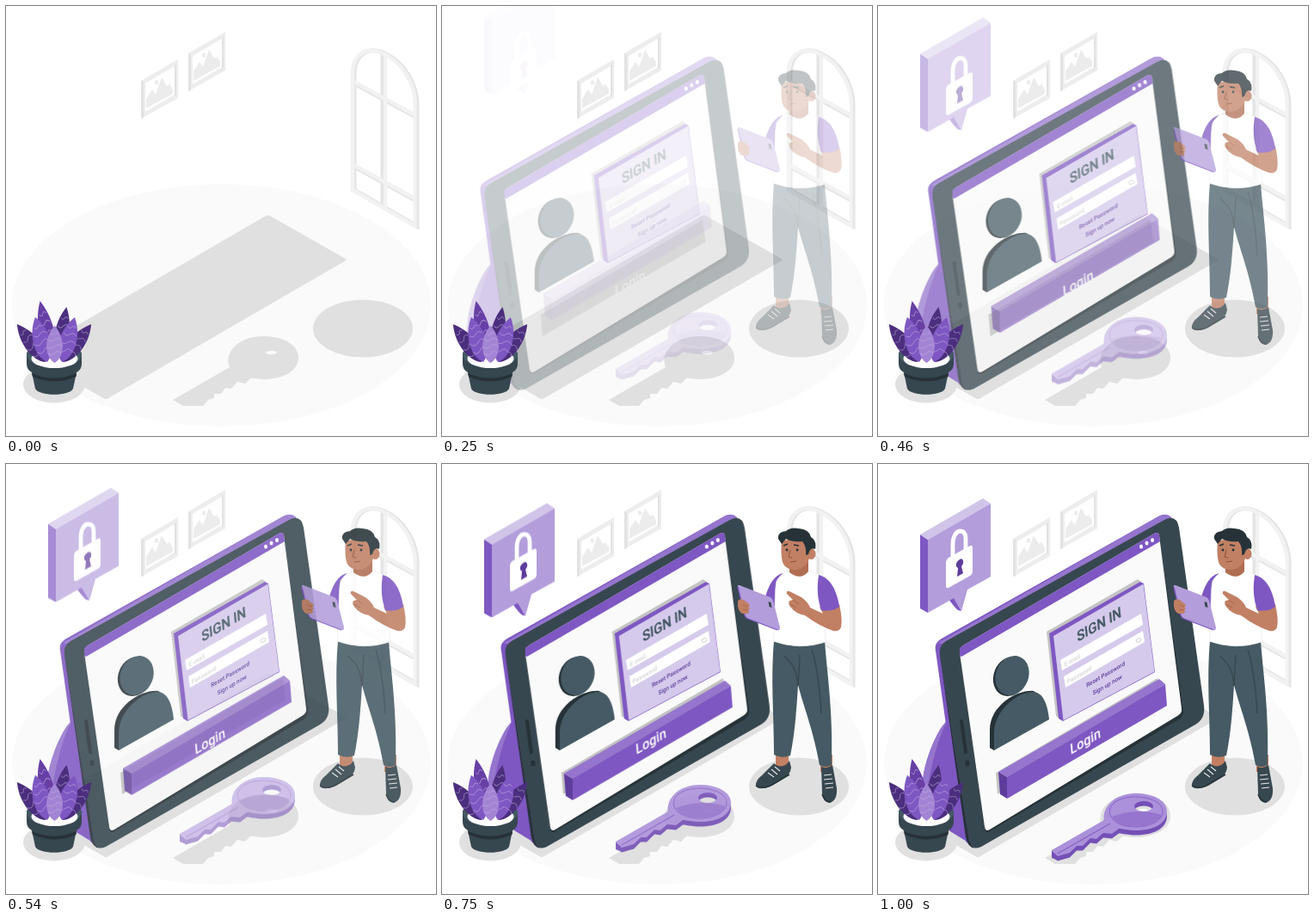
An HTML page without scripts that plays this animation: 500x500 px, repeating every 1040 ms.

```html
<!DOCTYPE html>
<html lang="en">
<head>
<meta charset="utf-8">
<title>Sign in</title>
<style>
html, body { margin: 0; width: 100%; height: 100%; overflow: hidden; background: #fff; }
svg { display: block; width: 100vw; height: 100vh; }
text { font-family: Roboto, Inter, sans-serif; font-weight: 500; }

.device, .button, .bubble, .lock, .man, .key { animation: 1040ms linear infinite; }
.device { --x: -32px; --y: 0px; animation-name: glide, fade; }
.button { --x: 0px; --y: -34px; animation-name: glide, fade; }
.bubble { --x: 0px; --y: -100px; animation-name: glide, fade-late; }
.lock { --x: 0px; --y: 34px; animation-name: glide; }
.man { animation-name: fade; }
.key { animation-name: drop, fade-slow; }

@keyframes glide {
  0% { transform: translate(var(--x), var(--y)); }
  12% { transform: translate(calc(var(--x) * .91), calc(var(--y) * .91)); }
  24% { transform: translate(calc(var(--x) * .7), calc(var(--y) * .7)); }
  36.5% { transform: translate(calc(var(--x) * .41), calc(var(--y) * .41)); }
  51.9% { transform: translate(calc(var(--x) * .125), calc(var(--y) * .125)); }
  64.4% { transform: translate(0, 0); }
  72.1% { transform: translate(calc(var(--x) * -.055), calc(var(--y) * -.055)); }
  80% { transform: translate(calc(var(--x) * -.062), calc(var(--y) * -.062)); }
  88% { transform: translate(calc(var(--x) * -.035), calc(var(--y) * -.035)); }
  96%, 100% { transform: translate(0, 0); }
}
@keyframes drop {
  0% { transform: translateY(-30px); }
  24% { transform: translateY(-27px); }
  36.5% { transform: translateY(-24px); }
  51.9% { transform: translateY(-19px); }
  64.4% { transform: translateY(-14px); }
  72.1% { transform: translateY(-10px); }
  96%, 100% { transform: none; }
}
@keyframes fade {
  0% { opacity: 0; }
  24% { opacity: .28; }
  36.5% { opacity: .58; }
  51.9% { opacity: .87; }
  64.4%, 100% { opacity: 1; }
}
@keyframes fade-late {
  0% { opacity: 0; }
  24% { opacity: .04; }
  36.5% { opacity: .16; }
  51.9% { opacity: .68; }
  64.4%, 100% { opacity: 1; }
}
@keyframes fade-slow {
  0% { opacity: 0; }
  24% { opacity: .16; }
  36.5% { opacity: .29; }
  51.9% { opacity: .54; }
  64.4% { opacity: .8; }
  72.1% { opacity: .9; }
  96%, 100% { opacity: 1; }
}
</style>
</head>
<body>
<svg viewBox="0 0 500 500" fill="none">
  <defs>
    <g id="leaf">
      <path d="M0 0C-13 -8 -15 -32 0 -50C15 -32 13 -8 0 0Z"/>
      <path d="M-9 -13q5 5 9 0t9 0M-10 -22q5 5 10 0t10 0M-8 -31q4 4 8 0t8 0M-5 -39q3 3 5 0t5 0" fill="none" stroke="#d1c4e9" stroke-opacity=".55" stroke-width=".8"/>
    </g>
    <g id="picture">
      <path d="M157 87L200 62V107L157 131Z" fill="#ededed"/>
      <path d="M157 87l3 1.500V130l-3 1ZM196 69l2 -1v36l-2 1Z" fill="#e2e2e2"/>
      <path d="M162 90L196 70V103L162 123Z" fill="#fff"/>
      <path d="M163 119V108L170 97L174 103L181 83L187 93L190 91L194 97V102Z" fill="#ececec"/>
      <ellipse cx="175" cy="89" rx="2.200" ry="2.800" fill="#ececec"/>
    </g>
    <path id="keyface" fill-rule="evenodd" d="M202 449L263 414C260 400 275 383 299 383C320 383 336 391 336 404C336 419 319 426 300 426C290 426 284 424 280 424L272 430L262 429L254 436L247 435L238 444L231 444L223 452L209 456Z
      M298 398a11 6 0 1 0 22 0a11 6 0 1 0 -22 0Z"/>
    <path id="arch" d="M403 214V79C403 57 418 46 438 55C461 65 476 91 476 115V256Z"/>
    <path id="bars" d="M439.500 56V235M403 88L476 128M403 185L476 225"/>
  </defs>

  <ellipse cx="250.500" cy="348" rx="243.500" ry="141" fill="#fafafa"/>

  <g fill="#e0e0e0">
    <path d="M302 244Q304.500 242.500 307 244L395 294Q396.500 295 395 296L118 456.500Q116 457.500 114 456.500L25 405Z"/>
    <ellipse cx="415" cy="375" rx="58" ry="33.500"/>
    <ellipse cx="56" cy="440" rx="36" ry="21.500"/>
    <path fill-rule="evenodd" d="M194 458L260 420C253 402 271 384 299 384C323 384 340 394 340 409C340 425 321 434 300 434C292 434 288 432 284 433L278 439L269 437L262 445L255 444L250 451L242 451V456L235 458L229 465H206Z
      M302 403a6.500 2.200 0 1 0 13 0a6.500 2.200 0 1 0 -13 0Z"/>
  </g>

  <use href="#picture"/>
  <use href="#picture" x="55" y="-32"/>

  <g stroke="#e4e4e4" stroke-width="5">
    <use href="#bars" x="-1.500"/>
    <use href="#arch" x="2"/>
  </g>
  <g stroke="#f2f2f2" stroke-width="4.500">
    <use href="#bars" x="1.500"/>
    <use href="#arch"/>
  </g>
  <path d="M478.500 116V258" stroke="#e8e8e8" stroke-width="2"/>

  <g class="bubble">
    <path d="M49 82L58 88V173L49 168Z" fill="#7e57c2"/>
    <path d="M49 82L122 40L131 46L58 88Z" fill="#d1c4e9"/>
    <path d="M82 157L88 155L97 171L93 170Q90 168 82 157Z" fill="#7e57c2"/>
    <path d="M58 88L131 46V131L104 146L97 171L88 156L58 173Z" fill="#b39ddb"/>
    <g class="lock">
      <path d="M87 110V94C87 84 91 78 96 78C101 78 102 82 102 87V101" stroke="#fff" stroke-width="4.800"/>
      <path d="M79 114Q79 111 82 109L107 95Q110 94 110 97V125Q110 128 107 130L82 144Q79 145 79 142Z" fill="#fff"/>
      <path d="M95 111c4 -3 6 4 2 8l2 8l-7 4l1 -10c-4 -2 -2 -8 2 -10Z" fill="#5e3c9c"/>
    </g>
  </g>

  <g class="device">
    <path d="M80 299C70 308 58 335 53 360L48 405L100 437Z" fill="#7e57c2"/>
    <path d="M80 299C70 308 58 335 53 360L48 405L54 408C58 365 66 328 80 299Z" fill="#9575cd"/>
    <path d="M67 217Q65 208 74 203L326 61Q335 56 341 62L350 80L376 290L112 446Q101 440 97 432Z" fill="#7e57c2"/>
    <path d="M70 208L328 60Q336 57 341 62L80 211Z" fill="#9575cd"/>
    <path d="M72 223Q70 211 79 206L333 65Q347 58 350 74L379 281Q381 296 369 303L120 445Q109 450 106 437Z" fill="#37474f"/>
    <path d="M72 223L106 437Q109 450 120 445L116 446Q105 449 102 434Z" fill="#263238"/>
    <path d="M95 220Q94 214 99 211L321 81Q326 78 327 83L355 286Q356 293 350 297L130 427Q125 430 124 424Z" fill="#263238"/>
    <path d="M95 220Q94 214 99 211L321 81Q326 78 327 83L353 284Q354 290 348 293L130 425Q125 428 124 422Z" fill="#fafafa"/>
    <path d="M95 223V218Q94 214 99 211L321 81Q326 78 327 83L328 90L97 224Z" fill="#7e57c2"/>
    <g fill="#fff">
      <ellipse cx="306" cy="96" rx="2" ry="2.500"/>
      <ellipse cx="312.500" cy="92" rx="2" ry="2.500"/>
      <ellipse cx="319" cy="88.500" rx="2" ry="2.500"/>
    </g>
    <path d="M97 299L102 335" stroke="#263238" stroke-width="4" stroke-linecap="round"/>
    <ellipse cx="104" cy="348" rx="2.600" ry="3.400" fill="#263238"/>

    <g fill="#263238">
      <ellipse cx="153.500" cy="247" rx="19" ry="23.500" transform="rotate(22 153.500 247)"/>
      <path d="M135 333L130 330V309C130 281 162 262 181 264L190 270Z"/>
    </g>
    <g fill="#455a64">
      <ellipse cx="156" cy="246" rx="19" ry="23.500" transform="rotate(22 156 246)"/>
      <path d="M135 333V311C136 285 164 264 181 265C192 266 197 279 199 297Z"/>
    </g>

    <path d="M196 195L302 134L306 137L200 199L211 296L207 293Z" fill="#c4c4c4"/>
    <path d="M199 197L305 137L309 139L322 242L215 299L210 296Z" fill="#7e57c2"/>
    <path d="M204 200L308.500 139.500L321.500 241.500L215.500 298Z" fill="#d5caec"/>
    <path d="M212 228L306 174L308 187L214 240ZM216 247L308 194L310 207L218 260Z" fill="#fff"/>
    <ellipse cx="303" cy="205" rx="3" ry="2" transform="rotate(-30 303 205)" stroke="#d5d5d5"/>
    <text transform="matrix(.86 -.5 .1 .98 232 207)" font-size="17" fill="#455a64" stroke="#455a64" stroke-width=".3">SIGN IN</text>
    <g font-size="7.500" fill="#d4d4d4">
      <text transform="matrix(.86 -.5 .1 .98 217 236)">E-mail</text>
      <text transform="matrix(.86 -.5 .1 .98 220 256)">Password</text>
    </g>
    <g font-size="7.200" fill="#5e3c9c">
      <text transform="matrix(.86 -.5 .1 .98 242.500 260)">Reset Password</text>
      <text transform="matrix(.86 -.5 .1 .98 250 269)">Sign up now</text>
    </g>

    <path d="M137 359L325 249L329 274L139 384Z" fill="#c4c4c4"/>
    <g class="button">
      <path d="M140 358L150 364V389L142 384Z" fill="#5e3c9c"/>
      <path d="M140 358L327 250L334 256L150 364Z" fill="#9575cd"/>
      <path d="M150 364L334 256L336 281L152 388L150 389Z" fill="#7e57c2"/>
    </g>
    <text transform="matrix(.86 -.5 .1 .98 224 338)" font-size="16.500" fill="#fff">Login</text>
  </g>

  <g class="man">
    <path d="M388 334h15v18h-15ZM440 338h14v20h-14Z" fill="#c17f63"/>
    <path d="M386 348C391 353 399 353 404 345L406 353Q405 361 398 365L383 374Q370 380 365 375Q364 368 372 362Z" fill="#37474f"/>
    <path d="M365 374Q372 379 384 373L404 361" stroke="#263238" stroke-width="1.500"/>
    <path d="M441 352Q448 355 454 350Q456 361 459 377Q460 391 451 394Q443 394 442 383Z" fill="#37474f"/>
    <path d="M442 384Q445 393 452 393" stroke="#263238" stroke-width="1.500"/>
    <path d="M379 359l7 5M383 355l7 6M387 352l6 5M444 362l9 -1M444 367l10 -1M445 372l10 -1M446 377l9 -1" stroke="#e6e6e6" stroke-width="1.100"/>

    <path d="M386 205H445C447 238 455 285 453 350Q446 354 439 350C432 310 421 284 414 257C412 290 410 315 405 339Q395 343 386 338C386 290 382 250 386 205Z" fill="#455a64"/>
    <path d="M414 258C413 244 410 233 397 223M414 258L416 222M430 216Q438 240 441 290" stroke="#37474f" stroke-width="1.400"/>

    <path d="M396 127C383 131 376 148 373 170L388 184Z" fill="#7e57c2"/>
    <path d="M403 125Q414 134 427 124L441 130C446 150 445 180 446 207Q416 217 385 206C388 180 386 150 389 136Q394 127 403 125Z" fill="#fff" stroke="#ebebeb" stroke-width=".7"/>
    <path d="M404 112H426V125Q417 136 404 126Z" fill="#b06d52"/>

    <path d="M395 89C394 99 394 113 398 118Q406 126 418 121Q427 116 428 105L427 85Z" fill="#c17f63"/>
    <ellipse cx="429.500" cy="104.500" rx="5" ry="6.500" fill="#c17f63"/>
    <path d="M391 87Q390 79 400 78Q405 73 415 75Q427 76 429 85Q436 89 434 99Q428 96 426 105L423 106Q424 96 419 90Q408 91 400 87L395 93Z" fill="#263238"/>
    <path d="M397 95l5 -2M409 94l6 1" stroke="#263238" stroke-width="1.500"/>
    <circle cx="401" cy="100" r="1.400" fill="#263238"/>
    <circle cx="413" cy="100" r="1.400" fill="#263238"/>
    <path d="M405 100L403 108L407 109M405 114l7 -1" stroke="#8f513a"/>

    <path d="M344 143Q343 140 346 141L382 155Q384 156 385 159L393 190Q393 194 390 193L356 180Q353 179 352 176Z" fill="#b39ddb"/>
    <path d="M344 143L352 176Q353 179 356 180L390 193" stroke="#7e57c2" stroke-width="1.300"/>
    <path d="M379.500 160l3 1l1 6l-3 -1Z" fill="#37474f"/>
    <path d="M344 160Q345 156 351 158L357 163Q359 165 356 166Q359 168 356 170Q359 173 354 174L349 174Q343 170 344 160Z" fill="#c17f63"/>
    <path d="M350 164l6 2M350 169l6 1" stroke="#a3624a" stroke-width=".8"/>

    <path d="M439 166L462 163Q466 181 464 190Q462 195 455 194Q438 188 422 176Q411 174 405 166Q402 162 404 159L408 158L401 151Q400 147 404 148L418 155Q426 161 428 167L443 174Z" fill="#c17f63"/>
    <path d="M408 158l7 5M405 163l7 4" stroke="#a3624a" stroke-width=".9"/>
    <path d="M438 129C451 132 459 146 462 166Q454 172 441 170C436 155 436 143 438 129Z" fill="#7e57c2"/>
  </g>

  <g class="key">
    <use href="#keyface" y="5.500" fill="#7450b6"/>
    <path d="M202 449L209 456V461L202 458Z" fill="#7450b6"/>
    <use href="#keyface" fill="#ab90da"/>
    <path d="M270 408C266 394 283 387 299 387C317 387 331 394 331 404C331 415 316 422 300 422C285 422 273 417 270 408Z" stroke="#8763c5"/>
    <path d="M272 410Q300 399 330 408Q325 422 300 422Q280 422 272 410Z" fill="#9575cd"/>
    <path d="M209 453L270 418" stroke="#8763c5" stroke-width="1.200"/>
  </g>

  <path d="M24 405C24 391 88 391 88 405V416Q88 423 82 426L78 445C74 454 38 454 34 445L30 426Q24 423 24 416Z" fill="#37474f"/>
  <path d="M24 405C24 391 88 391 88 405C88 425 24 425 24 405Z" fill="#455a64"/>
  <ellipse cx="56.500" cy="410" rx="27" ry="11" fill="#fff"/>
  <path d="M30 427Q56 438 82 427L81.500 431Q56 442 31 431Z" fill="#263238"/>
  <g>
    <use href="#leaf" transform="translate(54 411) rotate(-12) scale(.85 1.390)" fill="#673fa5"/>
    <use href="#leaf" transform="translate(60 409) rotate(10) scale(.8 1.200)" fill="#4b2e7d"/>
    <use href="#leaf" transform="translate(46 414) rotate(-37) scale(.85 1.100)" fill="#4b2e7d"/>
    <use href="#leaf" transform="translate(66 414) rotate(37) scale(.85 1.100)" fill="#4b2e7d"/>
    <use href="#leaf" transform="translate(48 414) rotate(-15) scale(.95 1.080)" fill="#7e57c2"/>
    <use href="#leaf" transform="translate(65 414) rotate(16) scale(.95 1.080)" fill="#7e57c2"/>
    <use href="#leaf" transform="translate(56.500 415) scale(.9 .87)" fill="#a384d4"/>
  </g>
</svg>
</body>
</html>
```
